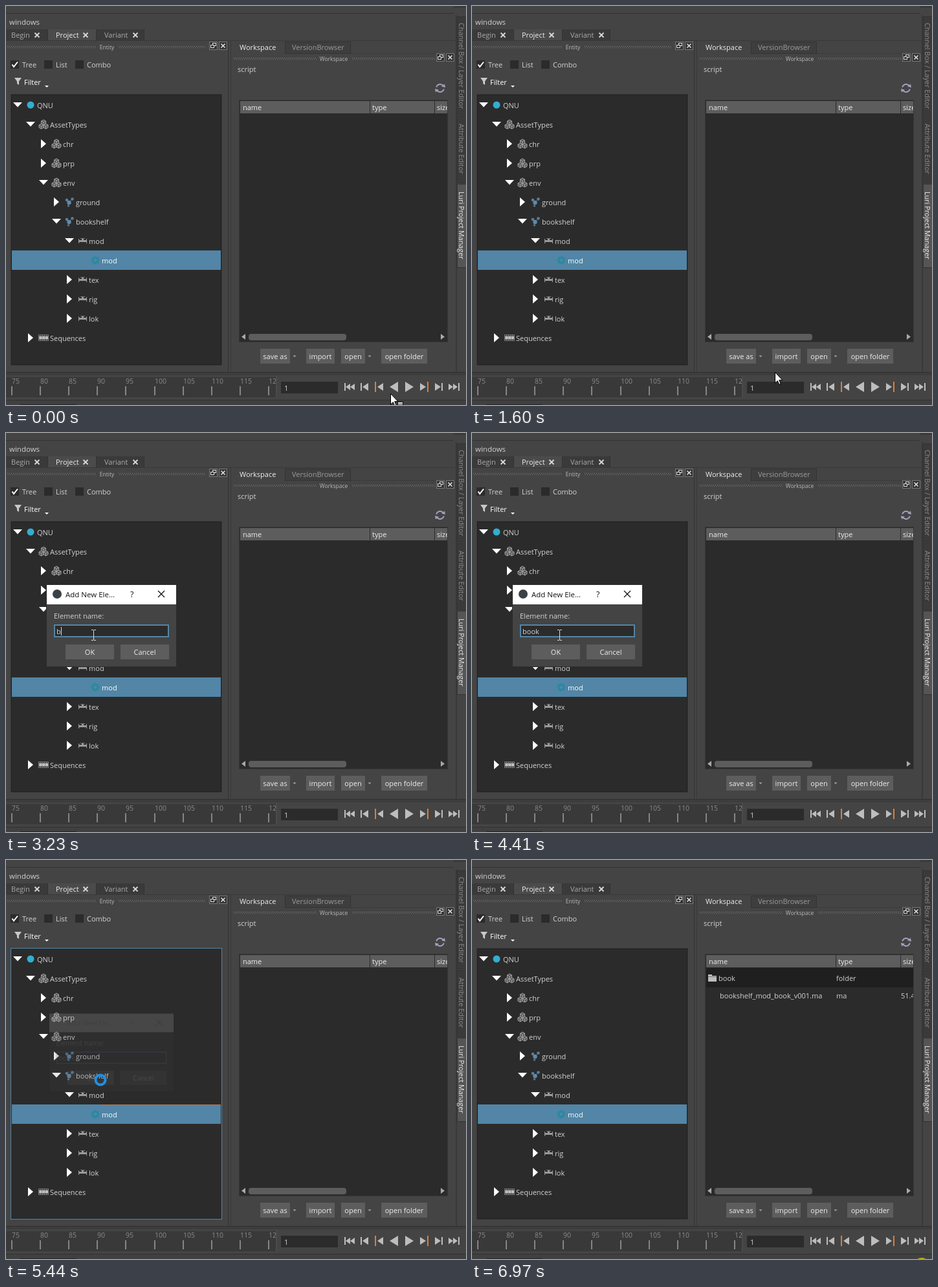
These frames come from a looping animation (711x617 px, 7060 ms). An HTML page with a canvas:

```html
<!DOCTYPE html>
<html lang="en">
<head>
<meta charset="utf-8">
<title>Project window</title>
<style>
html, body { margin: 0; width: 100%; height: 100%; overflow: hidden; background: #444; }
canvas { display: block; }
</style>
</head>
<body>
<canvas id="stage" width="711" height="617"></canvas>
<script>
const ctx = document.getElementById('stage').getContext('2d');
const LOOP = 7060;
const BG = '#444', DARK = '#2b2b2b', GREY = '#5d5d5d', BLUE = '#5285a6', TEXT = '#d2d2d2', DIM = '#8c8c8c', LINE = '#333';

// Stepped cursor moves: [start, end, steps, from, to, bend]
const MOVES = [
  [70, 610, 8, [594, 599], [447, 543], [505, 532]],
  [1070, 1370, 5, [447, 543], [468, 566]],
  [1830, 2170, 5, [468, 566], [138, 310]],
  [2470, 2470, 1, [138, 310], [135, 312]],
  [4880, 5040, 3, [135, 312], [146, 340]],
  [5970, 6050, 2, [146, 340], [253, 394]],
  [6440, 6740, 5, [253, 394], [690, 627]]
];
const CLICKS = [[780, 840], [1540, 1600], [2240, 2300], [5210, 5270], [6970, 7060]];
const KEYS = [3230, 3550, 3620, 3870];
const between = (t, a, b) => t >= a && t < b;

function cursorAt(t) {
  let at = MOVES[0][3];
  for (const [start, end, steps, a, b, bend] of MOVES) {
    if (t < start) break;
    const k = t >= end ? 1 : (Math.floor((t - start) / (end - start) * (steps - 1) + 1e-6) + 1) / steps;
    const p = k * k * (3 - 2 * k);
    const c = bend || [(a[0] + b[0]) / 2, (a[1] + b[1]) / 2];
    at = [0, 1].map(i => (1 - p) ** 2 * a[i] + 2 * p * (1 - p) * c[i] + p * p * b[i]);
  }
  return at.map(Math.round);
}

function box(x, y, w, h, fill) {
  ctx.fillStyle = fill;
  ctx.fillRect(x, y, w, h);
}
function frame(x, y, w, h, color) {
  ctx.strokeStyle = color;
  ctx.lineWidth = 1;
  ctx.strokeRect(x + .5, y + .5, w - 1, h - 1);
}
function text(str, x, y, color = TEXT, size = 11, align = 'left') {
  ctx.font = `${size}px "Open Sans", "Noto Sans", sans-serif`;
  ctx.textAlign = align;
  ctx.fillStyle = color;
  ctx.fillText(str, x, y);
}
function poly(points, fill, stroke) {
  ctx.beginPath();
  points.forEach(([x, y]) => ctx.lineTo(x, y));
  ctx.closePath();
  ctx.fillStyle = fill;
  ctx.fill();
  if (stroke) {
    ctx.strokeStyle = stroke;
    ctx.lineWidth = 1;
    ctx.stroke();
  }
}
function disc(x, y, r, fill) {
  ctx.beginPath();
  ctx.arc(x, y, r, 0, 7);
  ctx.fillStyle = fill;
  ctx.fill();
}
function path(points, color, width = 1) {
  ctx.beginPath();
  points.forEach(([x, y]) => ctx.lineTo(x, y));
  ctx.strokeStyle = color;
  ctx.lineWidth = width;
  ctx.stroke();
}
function cross(x, y, r, color, width) {
  path([[x - r, y - r], [x + r, y + r]], color, width);
  path([[x - r, y + r], [x + r, y - r]], color, width);
}
function clipped(x, y, w, h, draw) {
  ctx.save();
  ctx.beginPath();
  ctx.rect(x, y, w, h);
  ctx.clip();
  draw();
  ctx.restore();
}
const inside = ([px, py], x, y, w, h) => px >= x && px < x + w && py >= y && py < y + h;

function button(label, x, y, w, h, cursor) {
  box(x, y, w, h, inside(cursor, x, y, w, h) ? '#707070' : GREY);
  text(label, x + w / 2, y + 16, '#eee', 11, 'center');
}

function dots(x0, x1, y) {
  for (let x = x0; x < x1; x += 3) {
    box(x, y, 1, 1, '#858585');
    box(x + 1, y + 2, 1, 1, '#777');
  }
}
function dockTitle(label, mid, y, spans, bx) {
  text(label, mid, y + 4, '#bbb', 8.5, 'center');
  spans.forEach(([a, b]) => dots(a, b, y - 1));
  for (const x of [bx, bx + 15]) {
    box(x - 6, y - 8, 13, 13, '#353535');
    frame(x - 6, y - 8, 13, 13, '#777');
  }
  frame(bx - 1, y - 6, 6, 5, '#ddd');
  box(bx - 4, y - 3, 6, 5, '#353535');
  frame(bx - 4, y - 3, 6, 5, '#ddd');
  cross(bx + 15.5, y - 1.5, 3, '#ddd', 1.6);
}

function header() {
  box(0, 11, 692, 1, LINE);
  box(692, 0, 19, 3, '#3a3a3a');
  text('windows', 5, 29, TEXT, 11.5);
  box(0, 36, 213, 17, '#3a3a3a');
  box(65, 36, 74, 18, '#4b4b4b');
  [64, 139, 213].forEach(x => box(x, 36, 1, 17, LINE));
  box(0, 53, 695, 1, '#393939');
  [['Begin', 8, 48], ['Project', 77, 123], ['Variant', 152, 200]].forEach(([s, x, cx]) => {
    text(s, x, 49, s === 'Project' ? '#eee' : '#aaa');
    cross(cx, 45, 3.5, '#d8d8d8', 1.8);
  });
}

function sideTabs() {
  box(695, 14, 2, 553, '#393939');
  [['Channel Box / Layer Editor', 16, 153, 26], ['Attribute Editor', 170, 104, 182], ['Luri Project Manager', 275, 130, 287]]
    .forEach(([s, y, h, ty], i) => {
      box(697, y, 14, h, i === 2 ? '#555' : '#3a3a3a');
      frame(697, y, 15, h, LINE);
      ctx.save();
      ctx.translate(700, ty);
      ctx.rotate(Math.PI / 2);
      text(s, 0, 0, i === 2 ? '#eee' : DIM, 10.8);
      ctx.restore();
    });
}

function cube(x, y) {
  poly([[x, y - 4], [x + 3.5, y - 2], [x + 3.5, y + 2], [x, y + 4], [x - 3.5, y + 2], [x - 3.5, y - 2]], '#555', '#a2a2a2');
  path([[x - 3.5, y - 2], [x, y], [x + 3.5, y - 2]], '#a2a2a2');
  path([[x, y], [x, y + 4]], '#a2a2a2');
}
const ICONS = {
  project: (x, y) => disc(x, y, 5.5, '#32aed0'),
  group(x, y) {
    cube(x, y - 3);
    cube(x - 3.5, y + 3);
    cube(x + 3.5, y + 3);
  },
  asset(x, y) {
    path([[x - 4, y - 3], [x - 1, y + 1], [x + 4, y - 4]], '#56758e');
    path([[x - 1, y + 1], [x - 2, y + 6]], '#56758e');
    disc(x - 4, y - 3, 2.3, '#567f9e');
    disc(x + 4.5, y - 4.5, 2.3, '#567f9e');
    disc(x - .5, y + 1, 3.2, '#6389a6');
    disc(x - 1.5, y + 6, 1.8, '#4e7690');
  },
  step(x, y) {
    box(x - 6, y - 1, 13, 3, '#9a9a9a');
    box(x - 6, y - 3, 1, 7, '#9a9a9a');
    box(x + 6, y - 3, 1, 7, '#9a9a9a');
    box(x - 1, y - 4, 3, 4, '#9a9a9a');
    box(x - 3, y - 4, 7, 1, '#777');
  },
  gear(x, y) {
    ctx.strokeStyle = '#288aa1';
    ctx.lineWidth = 3;
    ctx.beginPath();
    ctx.arc(x, y, 4, 0, 7);
    ctx.stroke();
    for (let i = 0; i < 8; i++) {
      const a = i * Math.PI / 4;
      disc(x + 5.5 * Math.cos(a), y + 5.5 * Math.sin(a), 1.2, '#288aa1');
    }
  },
  film(x, y) {
    box(x - 8, y - 5, 16, 10, '#777');
    for (let i = 0; i < 3; i++) box(x - 6.5 + i * 4.7, y - 2, 4, 4, '#c0c0c0');
    for (let i = 0; i < 5; i++) {
      box(x - 7 + i * 3, y - 4, 2, 1, '#333');
      box(x - 7 + i * 3, y + 3, 2, 1, '#333');
    }
  }
};
const TREE = [
  ['QNU', 0, 'project', 1], ['AssetTypes', 1, 'group', 1], ['chr', 2, 'group', 0], ['prp', 2, 'group', 0],
  ['env', 2, 'group', 1], ['ground', 3, 'asset', 0], ['bookshelf', 3, 'asset', 1], ['mod', 4, 'step', 1],
  ['mod', 5, 'gear'], ['tex', 4, 'step', 0], ['rig', 4, 'step', 0], ['lok', 4, 'step', 0], ['Sequences', 1, 'film', 0]
];

function entityPanel(focused) {
  dockTitle('Entity', 156, 63, [[2, 139], [174, 309]], 320);
  [['Tree', 7], ['List', 59], ['Combo', 107]].forEach(([s, x]) => {
    box(x, 84, 13, 13, DARK);
    text(s, x + 18, 95);
  });
  path([[9.5, 90.5], [12, 94], [18, 86.5]], '#fff', 2);
  poly([[13, 111], [24, 111], [20, 116.5], [20, 122], [17, 120], [17, 116.5]], '#c8c8c8');
  text('Filter', 28, 122, '#fff');
  poly([[60, 123], [66, 123], [63, 126]], '#fff');

  box(8, 137, 325, 418, DARK);
  frame(7, 136, 327, 420, focused ? BLUE : '#373737');
  if (!focused) frame(8, 137, 325, 418, '#222');
  box(9, 378, 323, 30, BLUE);
  if (focused) box(147, 378, 185, 1, '#a0765b');
  TREE.forEach(([label, level, icon, open], i) => {
    const x = 18 + 20 * level, y = 153 + 30 * i;
    if (open) poly([[x - 7, y - 4], [x + 7, y - 4], [x, y + 3.5]], '#fff');
    else if (open === 0) poly([[x - 4, y - 7], [x + 4, y], [x - 4, y + 7]], '#fff');
    ICONS[icon](x + 20, y);
    text(label, x + 30, y + 5, level === 5 ? '#fff' : TEXT);
  });
}

function refreshIcon(x, y) {
  ctx.strokeStyle = '#a49fbd';
  ctx.lineWidth = 2;
  for (const a of [0, Math.PI]) {
    ctx.beginPath();
    ctx.arc(x, y, 6, a + .25, a + 2.6);
    ctx.stroke();
    const s = a ? -1 : 1;
    poly([[x - s * 8, y + s * 1], [x - s * 2, y + s * 2.5], [x - s * 7, y + s * 6.5]], '#a49fbd');
  }
}

function workspacePanel(filled, cursor) {
  box(343, 54, 1, 513, LINE);
  box(347, 54, 1, 513, '#3a3a3a');
  box(431, 55, 102, 18, '#3e3e3e');
  frame(431, 55, 102, 19, LINE);
  box(533, 73, 162, 1, '#3a3a3a');
  text('Workspace', 361, 68, '#eee');
  text('VersionBrowser', 442, 68, '#9c9c9c');
  dockTitle('Workspace', 506.5, 81, [[352, 480], [535, 663]], 671);
  text('script', 358, 102);
  refreshIcon(671, 127);

  box(360, 145, 323, 375, DARK);
  frame(360, 145, 323, 375, '#363636');
  clipped(362, 147, 320, 357, () => {
    box(362, 147, 320, 19, GREY);
    box(562, 147, 1, 19, DARK);
    box(662, 147, 1, 19, DARK);
    [['name', 366], ['type', 566], ['size', 666]].forEach(([s, x]) => text(s, x, 161, '#eee'));
    if (!filled) return;
    box(362, 167, 320, 30, '#1f1f1f');
    box(365, 177, 6, 3, '#bbb');
    box(365, 179, 13, 9, '#bbb');
    box(365, 180, 13, 1, '#777');
    [['book', 381, 187], ['folder', 563, 187], ['bookshelf_mod_book_v001.ma', 383, 214], ['ma', 563, 214], ['51.4', 663, 214]]
      .forEach(([s, x, y]) => text(s, x, y));
  });
  poly([[364, 511.5], [370, 507], [370, 516]], '#aaa');
  poly([[678, 511.5], [672, 507], [672, 516]], '#aaa');
  ctx.beginPath();
  ctx.roundRect(375, 507, 151, 10, 4);
  ctx.fillStyle = GREY;
  ctx.fill();

  [['save as', 393, 46], ['import', 464, 44], ['open', 518, 37], ['open folder', 580, 71]]
    .forEach(([s, x, w]) => button(s, x, 530, w, 23, cursor));
  for (const x of [446, 562]) poly([[x - 2.5, 540.5], [x + 2.5, 540.5], [x, 543]], '#aaa');
}

function timeline() {
  box(0, 566, 711, 1, '#303030');
  box(0, 567, 711, 4, '#3d3d3d');
  box(0, 574, 417, 31, '#393939');
  clipped(0, 574, 417, 31, () => {
    for (let i = 0; i < 10; i++) {
      const x = Math.round(8 + 44.1 * i);
      box(x, 588, 2, 14, '#858585');
      text(String(75 + 5 * i), x + 1, 584, '#8a8a8a', 10.5);
    }
  });
  box(417, 572, 2, 33, '#4b4b4b');
  box(425, 581, 88, 18, DARK);
  text('1', 430, 595);
  const C = '#bdbdbd', Y = 589;
  const tri = (x, dir, w = 8, h = 6) => poly([[x, Y - h], [x + dir * w, Y], [x, Y + h]], C);
  const bar = (x, color = C) => box(x, Y - 6, 2, 12, color);
  bar(523); tri(532, -1, 7, 5); tri(539, -1, 7, 5);
  bar(548); tri(560, -1, 9);
  box(570, 581, 2, 16, '#d9803f'); tri(583, -1, 9);
  tri(606, -1, 13, 8);
  tri(617, 1, 13, 8);
  tri(640, 1, 9); box(651, 581, 2, 16, '#d9803f');
  tri(663, 1, 9); bar(673);
  tri(684, 1, 7, 5); tri(691, 1, 7, 5); bar(699);
  box(0, 609, 711, 1, '#303030');
  box(0, 610, 711, 7, '#404040');
  box(22, 616, 87, 1, '#222');
}

function menu(cursor) {
  box(442, 558, 146, 21, 'rgba(0,0,0,.35)');
  box(439, 555, 147, 22, '#505050');
  frame(439, 555, 147, 22, '#333');
  if (inside(cursor, 440, 555, 145, 21)) box(443, 557, 141, 18, BLUE);
  box(444, 560, 12, 11, '#8ccbea');
  box(446, 561, 7, 8, '#2a6287');
  box(449, 562, 1, 6, '#fff');
  box(447, 564, 6, 1, '#fff');
  text('Add New...', 465, 570, '#eee');
}

function dialog(t, cursor) {
  let alpha = 1, scale = 1;
  if (t < 1760) [alpha, scale] = [.5, .97];
  else if (t >= 5440) [alpha, scale] = [.12, .96];
  else if (t >= 5360) [alpha, scale] = [.6, .98];
  const layer = document.createElement('canvas');
  ctx.save();
  ctx.globalAlpha = alpha;
  ctx.translate(163, 298);
  ctx.scale(scale, scale);
  ctx.translate(-163, -298);
  box(63, 235, 200, 126, BG);
  frame(62, 234, 202, 128, '#2c2c2c');
  box(63, 235, 200, 30, '#fff');
  disc(79, 249, 7, '#3a4247');
  text('Add New Ele...', 92, 254, '#111', 11.5);
  text('?', 192, 254, '#111', 12.5);
  cross(240, 249, 5, '#111', 1.2);
  text('Element name:', 74, 287);
  box(74, 296, 178, 20, DARK);
  ctx.strokeStyle = BLUE;
  ctx.lineWidth = 2;
  ctx.strokeRect(75, 297, 176, 18);
  const count = KEYS.filter(k => t >= k).length;
  text('book'.slice(0, count), 78, 311);
  if (between(t, 2780, 4410) || between(t, 4960, 5360)) {
    box([78, 85, 92, 99, 105][count], 300, 1, 13, '#ddd');
  }
  button('OK', 92, 327, 75, 23, cursor);
  button('Cancel', 177, 327, 75, 23, cursor);
  ctx.restore();
}

function pointer(t, [x, y], dialogOpen) {
  if (between(t, 5360, 5590)) {
    ctx.strokeStyle = '#1f8fe6';
    ctx.lineWidth = 4;
    ctx.beginPath();
    ctx.arc(x, y, 7.5, 0, 7);
    ctx.stroke();
  } else if (dialogOpen && inside([x, y], 74, 296, 178, 20)) {
    box(x, y - 7, 1, 15, '#ddd');
    for (const dy of [-8, 8]) {
      box(x - 3, y + dy, 3, 1, '#ddd');
      box(x + 1, y + dy, 3, 1, '#ddd');
    }
  } else {
    const shape = [[0, 0], [0, 16.5], [3.8, 13], [6.3, 18.8], [8.6, 17.8], [6.2, 12], [11.3, 12]];
    poly(shape.map(([a, b]) => [x + .5 + a, y + .5 + b]), '#fff', '#000');
    if (t < 500 && y > 570) {
      box(x + 11, y + 13, 9, 11, '#111');
      for (const dy of [14, 17, 20]) box(x + 12, y + dy, 7, 2, '#fff');
    }
  }
}

function draw(t) {
  const cursor = cursorAt(t);
  const dialogOpen = between(t, 1680, 5520);
  const focused = between(t, 840, 1600) || between(t, 5360, 6970);
  box(0, 0, 711, 617, BG);
  header();
  entityPanel(focused);
  workspacePanel(t >= 5590, cursor);
  sideTabs();
  timeline();
  if (between(t, 840, 1600)) menu(cursor);
  if (dialogOpen) dialog(t, cursor);
  if (CLICKS.some(([a, b]) => between(t, a, b))) {
    const [x, y] = t >= 6970 ? [695, 627] : [cursor[0] - 2, cursor[1] - 1];
    disc(x, y, 12, 'rgba(206,192,28,.82)');
  }
  pointer(t, cursor, dialogOpen);
}

const begin = performance.now();
function tick() {
  draw((performance.now() - begin) % LOOP);
  requestAnimationFrame(tick);
}
tick();
</script>
</body>
</html>
```
